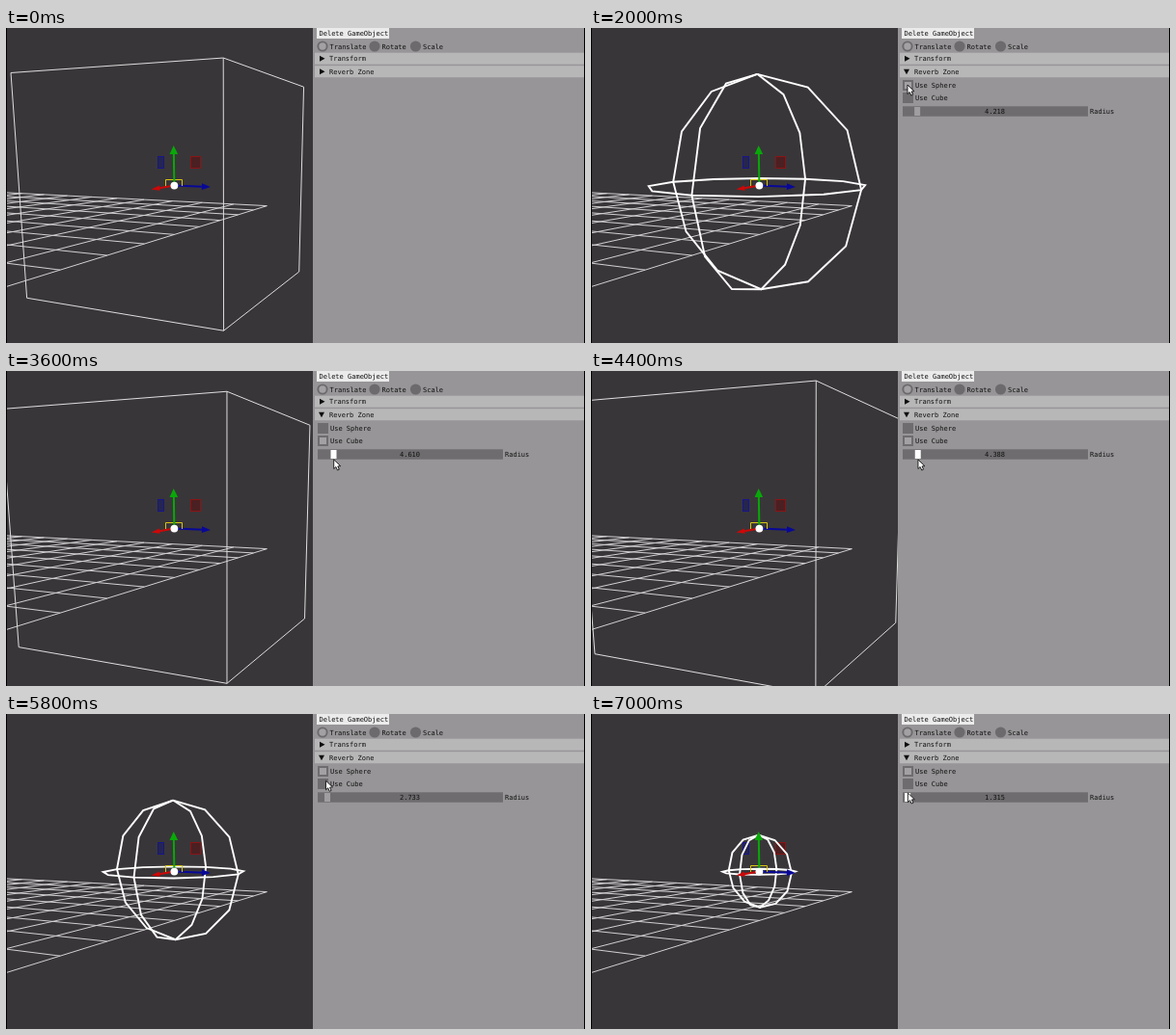
Write an HTML page with a canvas that moves like this. It is 600 px wide and 327 px high and loops after 7.1 s.

```html
<!DOCTYPE html>
<html lang="en">
<head>
<meta charset="utf-8">
<title>Reverb zone inspector</title>
<style>
html, body { margin: 0; width: 100%; height: 100%; overflow: hidden; background: #000; }
canvas { display: block; }
</style>
</head>
<body>
<canvas id="stage" width="600" height="327"></canvas>
<script>
const g = document.getElementById('stage').getContext('2d');
const LOOP = 7100, STEP = 100, LAG = 90;
const CX = 174.4, CY = 163.6;

// Camera: screen x, screen y and depth added per world unit
const AX = [21.64, 0.92, -0.0189];
const AY = [-0.45, -24.95, -0.0082];
const AZ = [-12.68, 1.83, -0.0425];

const lerp = (a, b, f) => a + (b - a) * f;
const ramp = (t, from, to) => Math.min(1, Math.max(0, (t - from) / (to - from)));
const ease = f => f * (2 - f);

function radiusAt(t) {
  let r = lerp(4.218, 5.1, ramp(t, 3400, 3850));
  r = lerp(r, 2.733, ramp(t, 4172, 4930));
  return lerp(r, 1.315, ramp(t, 6400, 6950));
}

const dragging = t => (t >= 3400 && t < 5200) || t >= 6400;

// Each move of the pointer: start, end, x, y
const MOVES = [
  [100, 950, 330, 47],
  [1300, 1700, 328, 59],
  [2000, 2600, 331, 72],
  [2900, 3300, 338, 92],
  [5100, 5500, 330, 57],
  [5600, 6300, 333, 82]
];

function pointerAt(t) {
  let x = 576, y = 318;
  for (const [from, to, nx, ny] of MOVES) {
    const f = ease(ramp(t, from, to));
    x = lerp(x, nx, f);
    y = lerp(y, ny, f);
  }
  return [dragging(t) ? 323.8 + 3.45 * radiusAt(t) : x, y];
}

const toScreen = (x, y, w) => [CX + x / w, CY + y / w];

function project(x, y, z) {
  const h = [0, 1, 2].map(i => x * AX[i] + y * AY[i] + z * AZ[i]);
  return toScreen(h[0], h[1], 1 + h[2]);
}

function trace(points) {
  g.beginPath();
  points.forEach(p => g.lineTo(p[0], p[1]));
}

function line(points, color, width = 1) {
  trace(points);
  g.strokeStyle = color;
  g.lineWidth = width;
  g.stroke();
}

function shape(points, color) {
  trace(points);
  g.fillStyle = color;
  g.fill();
}

function rect(x, y, w, h, color) {
  g.fillStyle = color;
  g.fillRect(x, y, w, h);
}

function disc(x, y, r, color) {
  g.beginPath();
  g.arc(x, y, r, 0, 7);
  g.fillStyle = color;
  g.fill();
}

function text(s, x, y, align = 'left') {
  g.font = '7px "DejaVu Sans Mono", monospace';
  g.textAlign = align;
  g.fillStyle = '#111';
  g.fillText(s, x, y);
}

function grid() {
  const at = (i, k) => toScreen(96 - 32.74 * i - 19.18 * k, 21 - 1.2 * i + 2.69 * k,
    1 + 0.0286 * i - 0.0643 * k);
  for (let n = 0; n < 10; n++) {
    line([at(n, 0), at(n, 10)], '#d2d1d2');
    line([at(0, n), at(12, n)], '#d2d1d2');
  }
}

function cube(r) {
  const v = (x, y, z) => project(x * r, y * r, z * r);
  const top = v(1, 1, 1), bottom = v(1, -1, 1);
  line([bottom, top, v(-1, 1, 1), v(-1, -1, 1), bottom, v(1, -1, -1), v(1, 1, -1), top], '#dedede');
}

function sphere(r) {
  const ring = place => {
    const points = [];
    for (let i = 0; i <= 12; i++) {
      const a = i * Math.PI / 6;
      points.push(project(...place(r * Math.sin(a), r * Math.cos(a))));
    }
    line(points, '#fff', 1.9);
  };
  ring((a, b) => [a, b, 0]);
  ring((a, b) => [0, b, a]);
  ring((a, b) => [a, 0, b]);
}

function handle(x, y, w, h, fill, edge) {
  rect(x, y, w, h, fill);
  g.strokeStyle = edge;
  g.lineWidth = 1;
  g.strokeRect(x + 0.5, y + 0.5, w - 1, h - 1);
}

// Arrow from the centre by (dx, dy) with a head of half width s
function arrow(dx, dy, s, color) {
  g.save();
  g.translate(CX, CY);
  g.rotate(Math.atan2(dy, dx));
  const n = Math.hypot(dx, dy);
  line([[0, 0], [n - 7, 0]], color, 2);
  shape([[n, 0], [n - 9, s], [n - 9, -s]], color);
  g.restore();
}

function gizmo() {
  arrow(-24, 4, 2.7, '#cc0808');
  arrow(37.5, 1.4, 3.3, '#080898');
  line([[165.5, 164], [165.5, 157.5], [182.5, 157.5], [182.5, 164]], '#d8c414');
  arrow(-0.7, -41.6, 4.3, '#08a808');
  disc(CX, CY, 3.9, '#fff');
}

function viewport(t, isSphere) {
  g.save();
  g.beginPath();
  g.rect(1, 0, 317, 327);
  g.clip();
  rect(1, 0, 317, 327, '#393639');
  grid();
  handle(157, 133, 7, 13, '#25254f', '#16168a');
  handle(191, 133, 11, 13, '#4b2022', '#8a1414');
  const r = radiusAt(t - LAG);
  if (isSphere) sphere(r * 1.06);
  else cube(r);
  gizmo();
  g.restore();
}

function radio(x, label, on) {
  disc(x, 19, 5.6, '#6c6a6c');
  if (on) disc(x, 19, 3.7, '#a3a1a3');
  text(label, x + 7.5, 21.5);
}

function header(y, label, open, hover) {
  rect(320, y, 279, 12, hover ? '#dedede' : '#b8b7b8');
  shape(open ? [[324, y + 3.5], [330, y + 3.5], [327, y + 9]]
    : [[325, y + 3], [330.5, y + 6], [325, y + 9]], '#0c0c0c');
  text(label, 335, y + 8.5);
}

function checkbox(y, label, on) {
  rect(323, y, 11, 11, '#6e6c6e');
  if (on) rect(325, y + 2, 7, 7, '#a3a1a3');
  text(label, 336, y + 8.3);
}

function slider(r, active) {
  rect(323, 81.3, 192, 10.4, '#6e6c6e');
  rect(320.6 + 3.45 * r, 82, 6, 9, active ? '#fff' : '#a09ea0');
  text(r.toFixed(3), 418.5, 89, 'center');
  text('Radius', 517, 89);
}

function panel(t, isSphere) {
  const open = t >= 1000;
  rect(318, 0, 281, 327, '#979597');
  rect(322, 0, 75, 11, '#ebebeb');
  text('Delete GameObject', 324.5, 8);
  radio(328, 'Translate', true);
  radio(382, 'Rotate', false);
  radio(424.5, 'Scale', false);
  header(25.7, 'Transform', false, false);
  header(39.2, 'Reverb Zone', open, t >= 900 && t < 1400);
  if (!open) return;
  checkbox(54, 'Use Sphere', isSphere);
  checkbox(67, 'Use Cube', !isSphere);
  slider(radiusAt(t), dragging(t));
}

function cursor(t) {
  if (t < 100) return;
  g.save();
  g.translate(...pointerAt(t));
  const outline = [[0, 0], [0, 9.5], [2.2, 7.5], [3.8, 11], [5.6, 10.2], [4.1, 6.9], [7, 6.7], [0, 0]];
  shape(outline, '#fff');
  line(outline, '#111', 0.9);
  g.restore();
}

function frame(now) {
  const t = Math.floor(now % LOOP / STEP) * STEP;
  const isSphere = (t >= 1700 && t < 2900) || t >= 5600;
  rect(0, 0, 600, 327, '#000');
  viewport(t, isSphere);
  panel(t, isSphere);
  cursor(t);
  requestAnimationFrame(frame);
}
frame(0);
</script>
</body>
</html>
```
